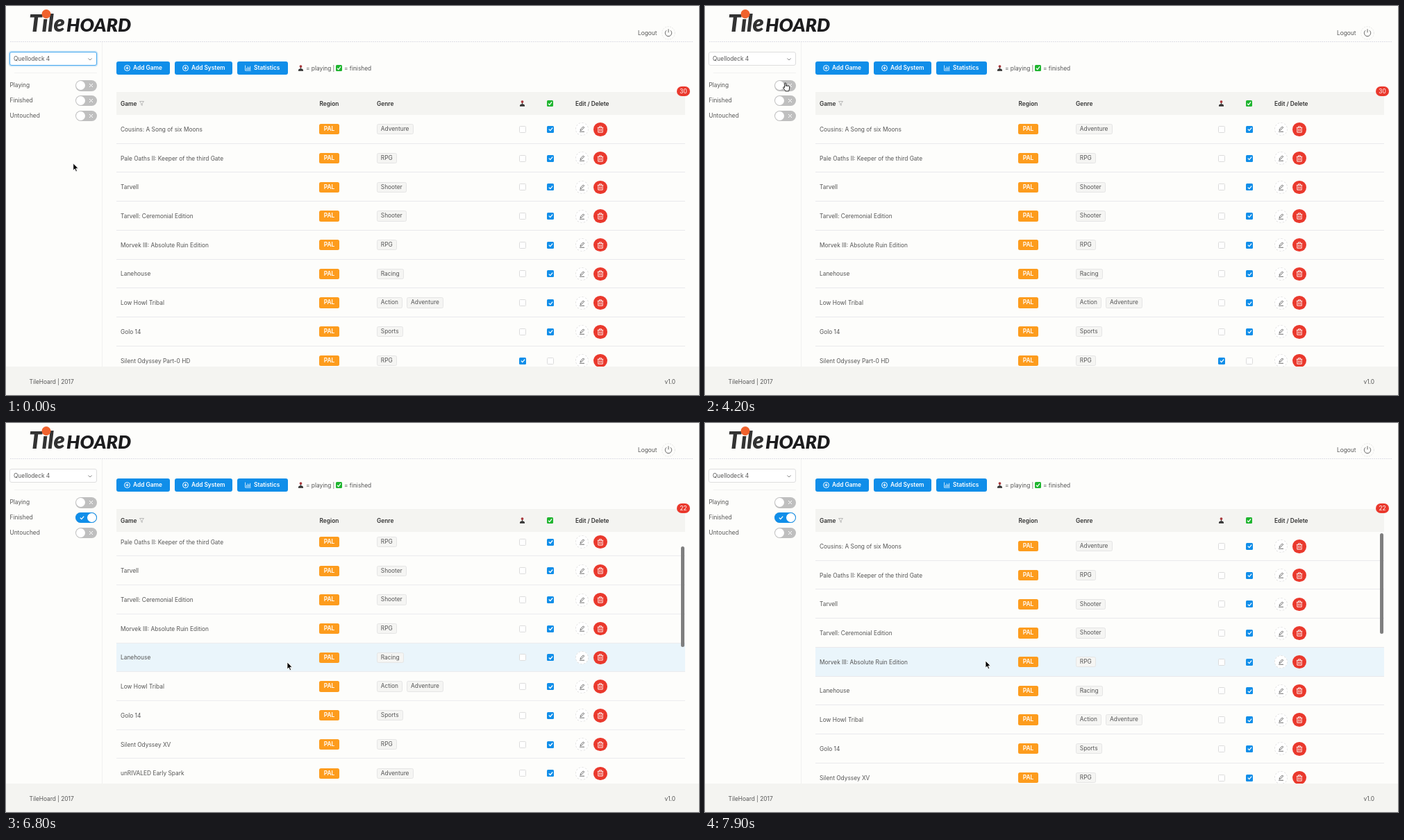
An HTML page for the animation above (8000 ms loop, 998x561 px).

```html
<!DOCTYPE html>
<html lang="en">
<head>
<meta charset="utf-8">
<title>Game shelf</title>
<style>
  html, body { margin: 0; width: 100%; height: 100%; overflow: hidden; background: #fdfdfb; }
  body { font: 8.34px/14px Inter, "Open Sans", sans-serif; color: #555; }
  #stage { position: relative; width: 998px; height: 561px; overflow: hidden; }
  #stage * { box-sizing: border-box; }
  .abs, .t { position: absolute; white-space: nowrap; }
  svg { display: block; fill: none; stroke: currentColor; overflow: visible; }
  b { font-weight: 600; }

  .select { left: 5px; top: 66px; width: 126px; height: 20px; border: 1px solid #dedede;
    border-radius: 3px; background: #fff; line-height: 18px; padding-left: 5px; }
  .select.focus { border-color: #49a9ee; box-shadow: 0 0 0 1.5px rgba(16,142,233,.2); }

  .switch { left: 100px; width: 31px; height: 15.4px; border-radius: 8px; background: #bfbfbf;
    color: #fff; overflow: hidden; --p: 0; }
  .switch i { position: absolute; inset: 0; background: #108ee9; opacity: var(--p); }
  .switch u { position: absolute; top: 1.2px; left: calc(1.2px + 15.6px * var(--p));
    width: 13px; height: 13px; border-radius: 50%; background: #fff; }
  .switch svg { position: absolute; top: 4.2px; }
  .switch .off { left: 18.5px; opacity: calc(1 - var(--p)); }
  .switch .on { left: 5.5px; opacity: var(--p); }

  .btn { top: 80px; height: 19px; border-radius: 3px; background: #108ee9; color: #fff;
    font-weight: 600; line-height: 19px; }
  .btn svg { position: absolute; top: 5px; left: 11px; }
  .btn span { position: absolute; left: 24px; }

  .head { left: 159px; top: 124px; width: 819px; height: 33px; background: #f4f4f1; }
  .head b { color: #333; top: 9.5px; }
  .body { left: 159px; top: 157px; width: 819px; height: 362.5px; overflow: hidden; }
  .row { position: relative; height: 41.73px; border-bottom: 1px solid #e9e9ec; background: #fdfdfb; }
  .row.hover { background: #eaf5fb; }
  .row > * { position: absolute; }
  .name { left: 6px; top: 13.8px; white-space: nowrap; }
  .region { left: 292px; top: 13.1px; width: 29px; height: 15.3px; border-radius: 2.5px;
    background: #fd9c1d; color: #fff; font-weight: 600; text-align: center; line-height: 15.3px; }
  .genres { left: 374.5px; top: 13.1px; display: flex; gap: 5.5px; }
  .genres span { height: 15.3px; line-height: 13.3px; padding: 0 5.3px; border: 1px solid #e5e5e5;
    border-radius: 2.5px; background: #f5f5f3; }
  .box { top: 15.8px; width: 10px; height: 10px; border: 1px solid #dcdcdc; border-radius: 1.5px; background: #fff; }
  .box.checked { border: 0; background: #108ee9; color: #fff; padding: 1.5px; }
  .edit { left: 661px; top: 11.4px; width: 19px; height: 19px; border: 1px dashed #e2e2e2;
    border-radius: 50%; background: #fff; padding: 4px; }
  .del { left: 687px; top: 11.1px; width: 19.5px; height: 19.5px; border-radius: 50%;
    background: #ea392d; color: #fff; padding: 4.8px; }

  .badge { top: 116px; height: 14px; border-radius: 7px; background: #ea392d; color: #fff;
    text-align: center; line-height: 14px; }
  .bar { left: 971.5px; width: 5px; height: 145px; border-radius: 2.5px; background: #7f7f7f; }
  .foot { left: 0; top: 519.5px; width: 998px; height: 42px; background: #f4f4f1; }
</style>
</head>
<body>
<svg width="0" height="0" style="position:absolute">
  <symbol id="plus" viewBox="0 0 9 9"><circle cx="4.5" cy="4.5" r="4"/><path d="M2.3 4.5h4.4M4.5 2.3v4.4"/></symbol>
  <symbol id="chart" viewBox="0 0 9 9"><path d="M.6 .5v7.6h8M2.6 7V4.4M4.3 7V2.4M6 7V3.6M7.6 7V1.8" stroke-width=".8"/></symbol>
  <symbol id="check" viewBox="0 0 7 7"><path d="M.8 3.6l2 2L6.2 1.6" stroke-width="1.3"/></symbol>
  <symbol id="cross" viewBox="0 0 7 7"><path d="M1 1l5 5M6 1L1 6"/></symbol>
  <symbol id="pencil" viewBox="0 0 9 9"><path d="M2 6.6l.5-1.8L6.4.9l1.3 1.3-3.9 3.9zM1 8.3h7" stroke-width=".85"/></symbol>
  <symbol id="trash" viewBox="0 0 10 10"><path d="M.8 2.4h8.4M3.4 2.2V.8h3.2v1.4M1.8 2.6v6.6h6.4V2.6M3.9 4.2v3.4M6.1 4.2v3.4" stroke-width=".9"/></symbol>
  <symbol id="stick" viewBox="0 0 9 9"><g stroke="none"><path d="M1 8.8V7l1.5-1.6h4L8 7v1.8zM4 3h1v3H4z" fill="#333"/><circle cx="4.5" cy="2.1" r="1.9" fill="#a8383c"/></g></symbol>
  <symbol id="done" viewBox="0 0 9 9"><rect width="9" height="9" rx="1.5" fill="#1fb52f" stroke="none"/><path d="M2 4.8l1.8 1.8L7 2.3" stroke="#fff" stroke-width="1.3"/></symbol>
</svg>

<div id="stage">
  <svg class="abs" width="998" height="60" style="left:0;top:0">
    <g font-family="Lato, sans-serif" font-weight="900" font-style="italic" stroke="none">
      <text x="33" y="37" font-size="33" fill="#333">Tile</text>
      <text x="87" y="37" font-size="27" fill="#1c1c1e">HOARD</text>
    </g>
    <circle cx="58" cy="11.5" r="6.5" fill="#f0622d" stroke="none"/>
    <path d="M6 51.5H990" stroke="#dedee6" stroke-dasharray="2 1"/>
    <circle cx="954" cy="39" r="9.3" stroke="#e6e6e6" stroke-dasharray="2 1.5"/>
    <path d="M951.2 35.2a4.7 4.7 0 1 0 5.6 0M954 33.3v5" stroke="#666"/>
  </svg>
  <span class="t" style="left:910px;top:32px">Logout</span>

  <div class="abs" style="left:137.5px;top:52px;width:1px;height:468px;background:#f1f1f0"></div>
  <div class="abs select" id="select">Quellodeck 4
    <svg class="abs" width="6" height="4" style="right:6.5px;top:7.5px"><path d="M.5 .5L3 3 5.5 .5" stroke="#888"/></svg>
  </div>
  <div class="abs" style="left:12px;top:96px;width:119px;height:1px;background:#f1f1f0"></div>
  <div id="switches"></div>

  <div class="abs btn" style="left:159px;width:77px"><svg width="9" height="9"><use href="#plus"/></svg><span>Add Game</span></div>
  <div class="abs btn" style="left:243px;width:83px"><svg width="9" height="9"><use href="#plus"/></svg><span>Add System</span></div>
  <div class="abs btn" style="left:333px;width:73px"><svg width="9" height="9"><use href="#chart"/></svg><span>Statistics</span></div>
  <svg class="abs" width="9" height="9" style="left:419.8px;top:85px"><use href="#stick"/></svg>
  <span class="t" style="left:432px;top:82.5px">= playing |</span>
  <svg class="abs" width="9" height="9" style="left:475px;top:85px"><use href="#done"/></svg>
  <span class="t" style="left:487px;top:82.5px">= finished</span>

  <div class="abs head">
    <b class="t" style="left:6px">Game</b>
    <svg class="abs" width="7" height="7" style="left:33px;top:13px"><path d="M.5 .5h6L4.2 3.6v2.8L2.8 5.6v-2z" stroke="#aaa" stroke-width=".8"/></svg>
    <b class="t" style="left:292.5px">Region</b>
    <b class="t" style="left:375px">Genre</b>
    <svg class="abs" width="9" height="9" style="left:580px;top:11.8px"><use href="#stick"/></svg>
    <svg class="abs" width="9" height="9" style="left:620px;top:11.8px"><use href="#done"/></svg>
    <b class="t" style="left:661px">Edit / Delete</b>
  </div>
  <div class="abs body"><div id="rows"></div></div>
  <div class="abs badge" id="badge"></div>
  <div class="abs bar" id="bar"></div>

  <div class="abs foot">
    <span class="t" style="left:33.5px;top:15px">TileHoard | 2017</span>
    <span class="t" style="right:34px;top:15px">v1.0</span>
  </div>

  <svg class="abs" id="arrow" width="9" height="13" style="left:0;top:0">
    <path d="M0 0V10l2.3-2.1 1.6 3.8 1.7-.7L4 7.2h3.2z" fill="#000" stroke="#fff" stroke-width=".8"/>
  </svg>
  <svg class="abs" id="hand" width="10" height="13" style="left:-3.4px;top:-.7px">
    <path d="M2.6 7.5V1.7a1 1 0 0 1 2 0V5.2c0-1 1.8-1 1.8.1c0-.9 1.7-.8 1.7.2c0-.7 1.5-.6 1.5.5V9c0 1.5-1 2-1 3.5H3.8C3.6 11 1.6 9.5.8 7.6c-.5-1.2.9-1.6 1.8-.1z" fill="#fff" stroke="#111" stroke-width=".9"/>
  </svg>
</div>

<script>
const $ = id => document.getElementById(id);
const LOOP = 8000, STEP = 100, ROW = 41.73, TOP = 157, VIEW = 362.5;
const ON = 2100, OFF = 3800, FINISHED = 5000;

// name, genres, currently playing
const games = [
  ["Cousins: A Song of six Moons", "Adventure"],
  ["Pale Oaths II: Keeper of the third Gate", "RPG"],
  ["Tarvell", "Shooter"],
  ["Tarvell: Ceremonial Edition", "Shooter"],
  ["Morvek III: Absolute Ruin Edition", "RPG"],
  ["Lanehouse", "Racing"],
  ["Low Howl Tribal", "Action,Adventure"],
  ["Golo 14", "Sports"],
  ["Silent Odyssey Part-0 HD", "RPG", true],
  ["Silent Odyssey XV", "RPG"],
  ["unRIVALED Early Spark", "Adventure"],
  ["unRIVALED: Third Twin", "Adventure"],
  ["Dunewalk: Collectors Edition", "Adventure"],
  ["Clay Wonder Mighty Pals", "Action,Adventure", true],
  ["Iron Cog Hollow V: The Vanished Ache", "Action", true],
  ["The Hexward 3: Cold Ride - Best of the Year Edition", "RPG", true],
  ["Ostravia Narratives Remastered", "RPG", true]
];

const icon = (id, size, cls = "") =>
  `<svg class="${cls}" width="${size}" height="${size}"><use href="#${id}"/></svg>`;
const box = (x, checked) =>
  `<div class="box ${checked ? "checked" : ""}" style="left:${x}px">${checked ? icon("check", 7) : ""}</div>`;

$("rows").innerHTML = games.map(([name, genres, playing]) => `<div class="row">
  <div class="name">${name}</div><div class="region">PAL</div>
  <div class="genres">${genres.split(",").map(g => `<span>${g}</span>`).join("")}</div>
  ${box(580, playing)}${box(620, !playing)}
  <div class="edit">${icon("pencil", 9)}</div><div class="del">${icon("trash", 10)}</div></div>`).join("");
const rows = [...$("rows").children];

$("switches").innerHTML = ["Playing", "Finished", "Untouched"].map((label, i) =>
  `<span class="t" style="left:5.5px;top:${106.5 + 22 * i}px">${label}</span>
  <div class="abs switch" style="top:${107.2 + 21.9 * i}px"><i></i>${icon("cross", 7, "off")}${icon("check", 7, "on")}<u></u></div>`).join("");
const switches = document.querySelectorAll(".switch");

const ease = p => p * p * (3 - 2 * p);
const ramp = (t, from, to) => ease(Math.min(1, Math.max(0, (t - from) / (to - from))));

// start, end, x and y reached
const moves = [
  [700, 1400, 115, 111.3],
  [4300, 4700, 115, 133],
  [5400, 6200, 405, 345],
  [7600, 7800, 404, 343]
];
function pointer(t) {
  let x = 96.8, y = 227;
  for (const [from, to, nx, ny] of moves) {
    const p = ramp(t, from, to);
    x += (nx - x) * p;
    y += (ny - y) * p;
  }
  return [x, y];
}

function draw(t) {
  const [x, y] = pointer(t);
  const filter = t >= FINISHED ? "finished" : t >= ON && t < OFF ? "playing" : "all";
  const scroll = 136.6 * (ramp(t, 6600, 7100) - ramp(t, 7200, 7700));

  const shown = rows.filter((row, i) => {
    const fits = filter === "all" || (filter === "playing") === !!games[i][2];
    row.style.display = fits ? "" : "none";
    return fits;
  });
  // the highlight lags behind while the list is scrolling
  let hover = x > 159 && y > TOP ? Math.floor((y - TOP) / ROW) : -1;
  if (scroll > 20) hover = 5;
  rows.forEach(row => row.classList.toggle("hover", row === shown[hover]));
  $("rows").style.transform = `translateY(${-scroll}px)`;

  $("bar").style.top = 159 + scroll * VIEW / (22 * ROW) + "px";
  $("bar").style.display = t > 6600 ? "" : "none";

  const count = { all: 30, playing: 5, finished: 22 }[filter];
  const width = count > 9 ? 19 : 14;
  $("badge").textContent = count;
  $("badge").style.left = 985 - width + "px";
  $("badge").style.width = width + "px";

  $("select").classList.toggle("focus", t < ON);
  switches[0].style.setProperty("--p", ramp(t, ON - 100, ON + 200) - ramp(t, OFF - 100, OFF + 200));
  switches[1].style.setProperty("--p", ramp(t, FINISHED - 100, FINISHED + 200));

  const link = x > 100 && x < 131 && y > 107 && y < 174 && (y - 107) % 21.9 < 15.4;
  for (const id of ["arrow", "hand"]) {
    $(id).style.transform = `translate(${x}px, ${y}px)`;
    $(id).style.display = (id === "hand") === link ? "" : "none";
  }
}

function tick(now) {
  draw(Math.floor(now % LOOP / STEP) * STEP);
  requestAnimationFrame(tick);
}
draw(0);
requestAnimationFrame(tick);
</script>
</body>
</html>
```
